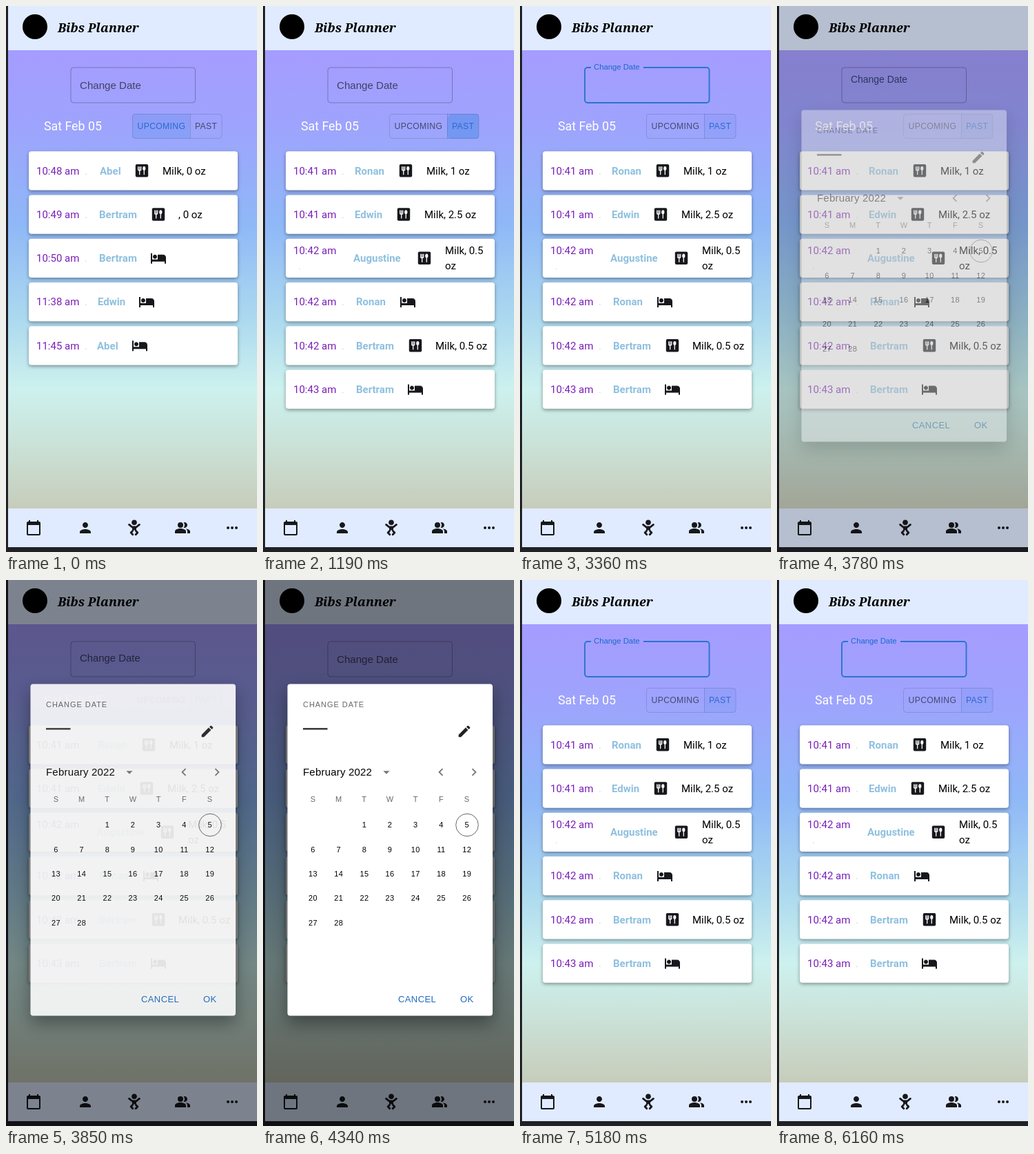
Write an HTML page that moves like this. It is 364x790 px and loops after 6.3 s.

```html
<!DOCTYPE html>
<html lang="en">
<head>
<meta charset="utf-8">
<title>Bibs Planner</title>
<style>
  html, body { margin: 0; width: 100%; height: 100%; overflow: hidden; background: #202127; }
  svg { display: block; }
  text { white-space: pre; }
  .brand { font: italic 700 18px "Noto Serif", serif; }
  .body { font: 15px Roboto, sans-serif; }
  .name { font-weight: 700; fill: #8ec0df; }
  .time { fill: #7a1fb8; }
  .date { font: 17.8px Roboto, sans-serif; fill: #fff; }
  .ui { font-family: "Liberation Sans", Arial, sans-serif; }
  .tab { font-size: 12.2px; letter-spacing: .35px; }
  .day { font-size: 11px; letter-spacing: .4px; text-anchor: middle; }
  .action { font-size: 13px; letter-spacing: .4px; fill: #1f69c0; }
  .soft { fill: rgba(0, 0, 0, .6); }
  .card { fill: #fff; filter: drop-shadow(0 2px 2.5px rgba(0, 0, 0, .38)); }
  .paper { fill: #fff; filter: drop-shadow(0 11px 12px rgba(0, 0, 0, .38)); }
  .bar { fill: #e0ebff; }
</style>
</head>
<body>
<script>
const LOOP = 6300, STEP = 70;
const PRESS = 980, SWITCH = 1120, FOCUS = 2450, OPEN = 3712, CLOSE = 4955;

const icons = {
  calendar: '<path d="M20 3h-1V1h-2v2H7V1H5v2H4c-1.1 0-2 .9-2 2v16c0 1.1.9 2 2 2h16c1.1 0 2-.9 2-2V5c0-1.1-.9-2-2-2zm0 18H4V8h16v13z"/>',
  person: '<path d="M12 12c2.21 0 4-1.79 4-4s-1.79-4-4-4-4 1.79-4 4 1.79 4 4 4zm0 2c-2.67 0-8 1.34-8 4v2h16v-2c0-2.66-5.33-4-8-4z"/>',
  baby: '<circle cx="12" cy="4.2" r="3.8"/><path d="M9 10h6v5.5H9z"/><path d="M4.6 7.4 9 11h6l4.4-3.6M9.6 16.4 7.2 19l2.6 2.8M14.4 16.4l2.4 2.6-2.6 2.8" fill="none" stroke="#17181c" stroke-width="2.8" stroke-linecap="round" stroke-linejoin="round"/>',
  people: '<circle cx="9" cy="8" r="4"/><path d="M9 13c-2.67 0-8 1.34-8 4v3h16v-3c0-2.66-5.33-4-8-4zM16.67 13.13C18.04 14.06 19 15.32 19 17v3h4v-3c0-2.18-3.57-3.47-6.33-3.87zM15 12c2.21 0 4-1.79 4-4s-1.79-4-4-4c-.47 0-.91.1-1.33.24C14.5 5.27 15 6.58 15 8s-.5 2.73-1.33 3.76c.42.14.86.24 1.33.24z"/>',
  more: '<circle cx="6" cy="12" r="2"/><circle cx="12" cy="12" r="2"/><circle cx="18" cy="12" r="2"/>',
  food: '<rect x="2.8" y="2.8" width="18.4" height="18.4" rx="2"/><path d="M6.7 6v4.2q0 1.6 2 1.6t2-1.6V6M8.7 6v12M15.3 11v7" fill="none" stroke="#fff" stroke-width="1.3"/><ellipse cx="15.3" cy="8.8" rx="2.1" ry="3" fill="#fff"/>',
  bed: '<path d="M7 13c1.66 0 3-1.34 3-3S8.66 7 7 7s-3 1.34-3 3 1.34 3 3 3zm12-6h-8v7H3V5H1v15h2v-3h18v3h2v-9c0-2.21-1.79-4-4-4z"/>',
  edit: '<path d="M3 17.25V21h3.75L17.81 9.94l-3.75-3.75L3 17.25zM20.71 7.04c.39-.39.39-1.02 0-1.41l-2.34-2.34c-.39-.39-1.02-.39-1.41 0l-1.83 1.83 3.75 3.75 1.83-1.83z"/>',
  drop: '<path d="M7 10l5 5 5-5z"/>',
  prev: '<path d="M15.41 7.41L14 6l-6 6 6 6 1.41-1.41L10.83 12z"/>',
  next: '<path d="M10 6L8.59 7.41 13.17 12l-4.58 4.59L10 18l6-6z"/>'
};

// time, name, name x, icon x, note, note x
const upcoming = [
  ['10:48 am', 'Abel', 136, 197, 'Milk, 0 oz', 227],
  ['10:49 am', 'Bertram', 135, 221, ', 0 oz', 250],
  ['10:50 am', 'Bertram', 135, 221],
  ['11:38 am', 'Edwin', 133, 204],
  ['11:45 am', 'Abel', 132, 194]
];
const past = [
  ['10:41 am', 'Ronan', 133, 207, 'Milk, 1 oz', 237],
  ['10:41 am', 'Edwin', 133, 204, 'Milk, 2.5 oz', 234],
  ['10:42 am', 'Augustine', 131, 234, 'Milk, 0.5|oz', 264],
  ['10:42 am', 'Ronan', 135, 210],
  ['10:42 am', 'Bertram', 135, 221, 'Milk, 0.5 oz', 250],
  ['10:43 am', 'Bertram', 135, 221]
];

const text = (x, y, cls, s, attrs = '') => `<text x="${x}" y="${y}" class="${cls}" ${attrs}>${s}</text>`;
const icon = (name, cx, cy, scale = 1, fill = '#17181c') =>
  `<g transform="translate(${cx - 12 * scale} ${cy - 12 * scale}) scale(${scale})" fill="${fill}">${icons[name]}</g>`;

function card([time, name, nameX, iconX, note, noteX], i) {
  const top = 210.3 + 63.25 * i, mid = top + 28, base = top + 33.3;
  const lines = note ? note.split('|') : [];
  const wraps = lines.length > 1;
  const first = wraps ? base - 11 : base;
  return `<rect class="card" x="33" y="${top}" width="303" height="56.3" rx="4"/>`
    + text(44, first, 'body time', time)
    + text(wraps ? 51 : 114, wraps ? base + 11 : base, 'body', '.', 'fill="#d9cde6"')
    + text(nameX, base, 'body name', name)
    + icon(note ? 'food' : 'bed', iconX, mid)
    + lines.map((s, k) => text(noteX, first + 22 * k, 'body', s)).join('');
}

function calendar() {
  const colX = c => 72.5 + 37.2 * c;
  let out = [...'SMTWTFS'].map((d, c) => text(colX(c), 320.5, 'ui day soft', d)).join('');
  for (let d = 1; d <= 28; d++) {
    const cell = d + 1;
    out += text(colX(cell % 7), 358.3 + 35.3 * Math.floor(cell / 7), 'ui day', d);
  }
  return out + '<circle cx="296" cy="354.5" r="16.3" fill="none" stroke="#666"/>';
}

document.body.innerHTML = `
<svg width="364" height="790" viewBox="0 0 364 790">
  <defs>
    <linearGradient id="sky" x2="0" y2="1">
      <stop offset="0" stop-color="#a59cff"/>
      <stop offset=".16" stop-color="#9ea3fd"/>
      <stop offset=".38" stop-color="#8fb8f7"/>
      <stop offset=".58" stop-color="#abd8ef"/>
      <stop offset=".74" stop-color="#cdf1ee"/>
      <stop offset=".86" stop-color="#cae2d8"/>
      <stop offset="1" stop-color="#c7ccba"/>
    </linearGradient>
    <clipPath id="pastClip"><path d="M267 156h42a4 4 0 0 1 4 4v28a4 4 0 0 1-4 4h-42z"/></clipPath>
  </defs>
  <rect width="364" height="790" fill="#202127"/>
  <rect x="3" y="64" width="361" height="663" fill="url(#sky)"/>
  <rect class="bar" x="3" width="361" height="64"/>
  <circle cx="42" cy="30" r="18"/>
  ${text(75, 38, 'brand', 'Bibs Planner')}

  <path id="field" fill="none"/>
  <text id="label" class="ui" x="107">Change Date</text>
  ${text(55, 180, 'date', 'Sat Feb 05')}
  <path id="upBg" d="M267 156h-80a4 4 0 0 0-4 4v28a4 4 0 0 0 4 4h80z" fill="#1976d2"/>
  <g clip-path="url(#pastClip)" fill="#1976d2">
    <rect id="pastBg" x="267" y="156" width="46" height="36"/>
    <circle id="ripple" cx="292" cy="175"/>
  </g>
  <path d="M267.5 156v36" stroke="#000" stroke-opacity=".13"/>
  <rect x="183.5" y="156.5" width="129.5" height="35" rx="4" fill="none" stroke="#000" stroke-opacity=".13"/>
  ${text(190.5, 178, 'ui tab', 'UPCOMING', 'id="upText"')}
  ${text(274, 178, 'ui tab', 'PAST', 'id="pastText"')}
  <g id="upList">${upcoming.map(card).join('')}</g>
  <g id="pastList">${past.map(card).join('')}</g>

  <rect class="bar" x="3" y="727" width="361" height="56"/>
  ${['calendar', 'person', 'baby', 'people', 'more'].map((n, i) => icon(n, [40, 115, 186, 256, 328][i], 755)).join('')}

  <rect id="shade" width="364" height="790"/>
  <g id="dialog">
    <rect class="paper" x="35.5" y="150.5" width="297.5" height="480" rx="4"/>
    ${text(58, 183.7, 'ui soft', 'CHANGE DATE', 'font-size="11" letter-spacing=".95"')}
    <path d="M58 215.3h35.5" stroke="#222" stroke-width="2.2"/>
    ${icon('edit', 292, 219, .93, '#222')}
    ${text(58, 283, 'ui', 'February 2022', 'font-size="15" letter-spacing=".2"')}
    ${icon('drop', 179, 278, .93, '#757575')}
    ${icon('prev', 258, 278, .93, '#757575')}
    ${icon('next', 306, 278, .93, '#757575')}
    ${calendar()}
    <rect id="cancelBg" x="188" y="589" width="71" height="34" rx="4" fill="#1976d2" fill-opacity=".05"/>
    ${text(196, 610.5, 'ui action', 'CANCEL')}
    ${text(286, 610.5, 'ui action', 'OK')}
  </g>
</svg>`;

const el = id => document.getElementById(id);
const set = (id, attrs) => { for (const k in attrs) el(id).setAttribute(k, attrs[k]); };
const show = (id, on) => set(id, { visibility: on ? 'visible' : 'hidden' });
const clamp = v => Math.min(1, Math.max(0, v));

// cubic-bezier(a, 0, .2, 1)
function bezier(t, a) {
  t = clamp(t);
  if (t === 0 || t === 1) return t;
  let lo = 0, hi = 1, s;
  for (let i = 0; i < 24; i++) {
    s = (lo + hi) / 2;
    const x = 3 * a * s * (1 - s) ** 2 + .6 * s * s * (1 - s) + s ** 3;
    if (x < t) lo = s; else hi = s;
  }
  return 3 * s * s * (1 - s) + s ** 3;
}
const easeOut = t => bezier(t, 0);
const easeInOut = t => bezier(t, .4);

function drawField(t) {
  const focused = t >= FOCUS && t < OPEN || t >= CLOSE;
  const since = t - (t >= CLOSE ? CLOSE : t >= OPEN ? OPEN : FOCUS);
  const moved = easeOut(since / 200);
  const up = t < FOCUS ? 0 : focused ? moved : 1 - moved;
  const notch = t < FOCUS ? 0 : focused ? easeOut((since - 50) / 100) : 1 - easeOut(since / 50);
  const mix = (a, b) => a + (b - a) * up;
  set('field', {
    d: `M${103 + 76 * notch} 89H270.5a4 4 0 0 1 4 4V136a4 4 0 0 1-4 4H98a4 4 0 0 1-4-4V93a4 4 0 0 1 4-4H103`,
    stroke: focused ? '#2a74d0' : 'rgba(0,0,0,.27)',
    'stroke-width': focused ? 1.9 : 1
  });
  set('label', {
    y: mix(119.6, 92),
    'font-size': mix(15.1, 11.3),
    fill: `rgba(${mix(0, 25)},${mix(0, 105)},${mix(0, 205)},${mix(.6, 1)})`
  });
}

function drawTabs(t) {
  const isPast = t >= SWITCH;
  const blue = '#2a6ad0', grey = 'rgba(0,0,0,.56)';
  show('upList', !isPast);
  show('pastList', isPast);
  set('upText', { fill: isPast ? grey : blue });
  set('pastText', { fill: isPast ? blue : grey });
  set('upBg', { opacity: isPast ? 0 : t < 280 ? .14 : .08 });
  set('pastBg', { opacity: !isPast ? (t < 630 ? 0 : .04) : t < 2030 ? .14 : .08 });
  set('ripple', {
    r: t < PRESS ? 0 : 36 * easeInOut((t - PRESS + 60) / 550),
    opacity: .2 * (1 - easeInOut((t - SWITCH) / 550))
  });
}

function drawDialog(t) {
  const alpha = t < CLOSE ? easeInOut((t - OPEN) / 225) : 1 - easeInOut((t - CLOSE) / 195);
  set('shade', { opacity: alpha / 2 });
  set('dialog', { opacity: alpha });
  show('cancelBg', t >= 4760);
}

const start = performance.now();
function frame() {
  const t = Math.floor((performance.now() - start) % LOOP / STEP) * STEP;
  drawField(t);
  drawTabs(t);
  drawDialog(t);
  requestAnimationFrame(frame);
}
frame();
</script>
</body>
</html>
```
